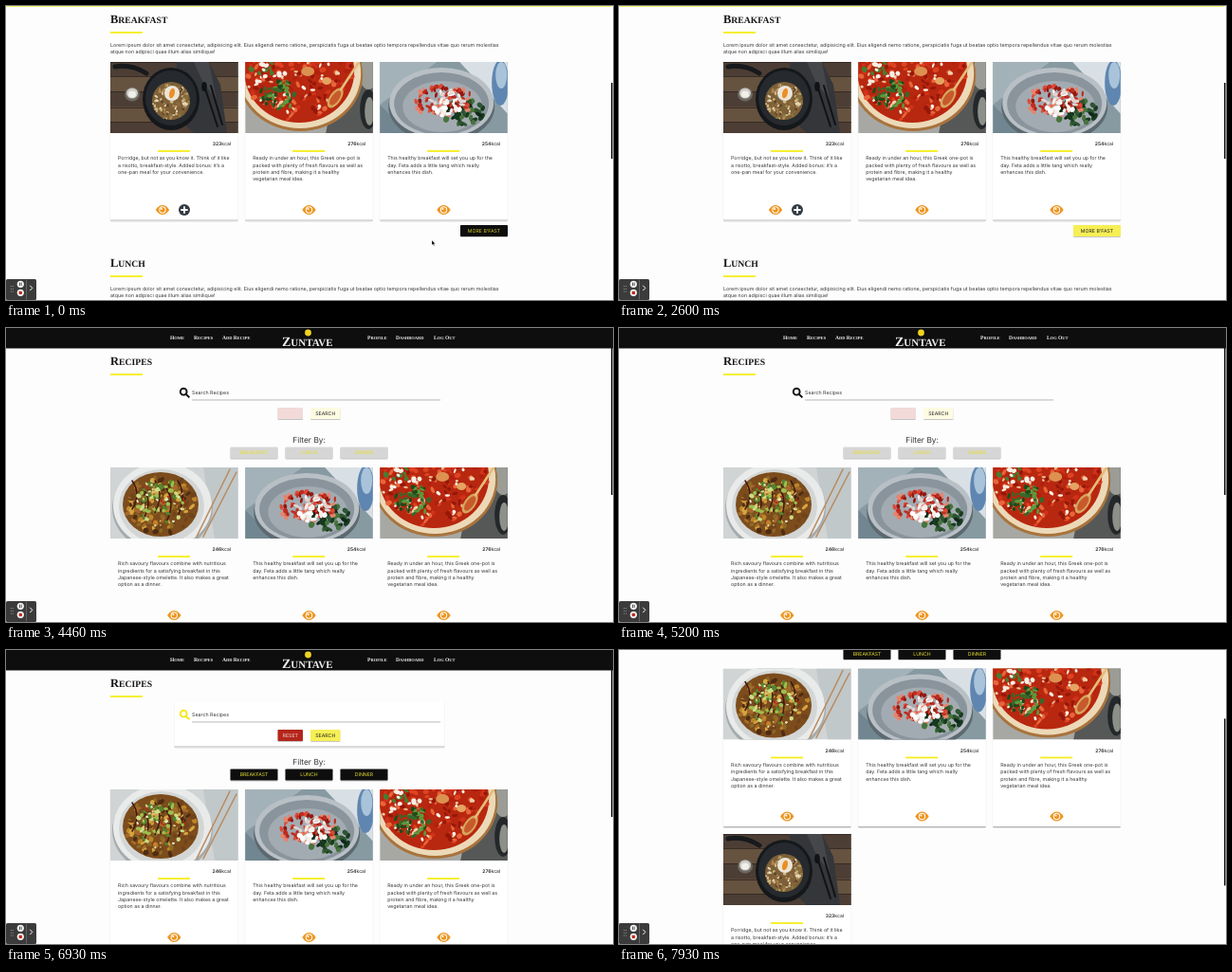
Recreate the animation shown at these times as an HTML page. Size 640 by 310 pixels, loop 8000 ms.

```html
<!DOCTYPE html>
<html lang="en">
<head>
<meta charset="utf-8">
<title>Recipe site</title>
<style>
  html, body { margin: 0; height: 100%; overflow: hidden; background: #fdfdfd; }
  svg { display: block; width: 100vw; height: 100vh; }
  svg svg { width: auto; height: auto; }
  text { font: 5.3px Inter, sans-serif; fill: #383838; text-rendering: geometricPrecision; white-space: pre; }
  .title, .title tspan { font-family: "Liberation Serif", serif; font-weight: bold; }
  .mid { text-anchor: middle; }
  .end { text-anchor: end; font-weight: 500; }
  .end tspan { font-weight: 700; }
  .bar { fill: #f6ee1c; }
  #recipes .button { fill-opacity: calc(.17 + .83 * var(--p)); }
  #recipes .shadow { opacity: var(--p); }
  #lens { fill: none; stroke-width: 1.9; stroke: color-mix(in srgb, #f4e71c calc(var(--p) * 100%), #111); }
  #more .button { fill: color-mix(in srgb, #f6ef55 calc(var(--h) * 100%), #0e0e0e); }
  #more text { fill: color-mix(in srgb, #222 calc(var(--h) * 100%), #d8cf2a); }
</style>
</head>
<body>
<svg id="stage" viewBox="0 0 640 310" preserveAspectRatio="none"></svg>
<script>
let seed = 7;
const random = () => (seed = seed * 16807 % 2147483647) / 2147483647;

const rect = (x, y, w, h, fill, extra = '') => `<rect x="${x}" y="${y}" width="${w}" height="${h}" fill="${fill}" ${extra}/>`;
const oval = (x, y, rx, ry, fill, extra = '') => `<ellipse cx="${x}" cy="${y}" rx="${rx}" ry="${ry}" fill="${fill}" ${extra}/>`;
const shape = (d, fill) => `<path d="${d}" fill="${fill}"/>`;
const line = (d, color, width) => `<path d="${d}" fill="none" stroke="${color}" stroke-width="${width}" stroke-linecap="round"/>`;
const text = (x, y, s, extra = '') => `<text x="${x}" y="${y}" ${extra}>${s}</text>`;
const lines = (x, y, list) => list.map((s, i) => text(x, y + i * 7.4, s)).join('');
const bar = (x, y) => rect(x, y - .9, 34, 1.8, '', 'class="bar"');

// White panel with faint sides and a stronger shadow underneath
const panel = (w, h) => '<g class="shadow">' + rect(-.5, 0, w + 1, h, '#ededed') + rect(0, 0, w, h, '#fff') +
  rect(0, h - .5, w, 1, '#b5b5b5') + rect(.5, h + .5, w - 1, 1, '#dedede') + '</g>';

// Small irregular pieces scattered over an ellipse
function scatter(count, x, y, rx, ry, colors, size) {
  let out = '';
  for (let i = 0; i < count; i++) {
    const angle = random() * 6.283, r = Math.sqrt(random());
    const px = (x + Math.cos(angle) * r * rx).toFixed(1), py = (y + Math.sin(angle) * r * ry).toFixed(1);
    const w = size * (.6 + random() * .7), h = size * (.4 + random() * .5);
    out += oval(px, py, w.toFixed(1), h.toFixed(1), colors[i % colors.length],
      `transform="rotate(${Math.round(random() * 180)} ${px} ${py})"`);
  }
  return out;
}

// Upper-case lettering with a larger initial for each word
const caps = (x, y, s, big, small, fill) =>
  `<text class="title" x="${x}" y="${y}" style="fill:${fill}">` + s.split(' ').map(word =>
    `<tspan style="font-size:${big}px">${word[0]}</tspan>` +
    `<tspan style="font-size:${small}px">${word.slice(1).toUpperCase()} </tspan>`).join('') + '</text>';

const photos = {
  porridge: rect(0, 0, 135, 75, '#58483c') + [0, 15, 31, 48, 63].map((y, i) =>
      rect(0, y, 135, 16, i % 2 ? '#65523f' : '#4c3e34') + rect(0, y, 135, .8, '#2f2620')).join('') +
    shape('M70 0L104 0L116 24L123 75L88 75L72 60Z', '#34363a') + shape('M88 0L104 0L112 40L98 22Z', '#45474b') +
    line('M5 5Q22 2 38 12', '#17191c', 5) +
    oval(64, 39, 30, 33, '#15181b') + oval(64, 38, 27, 29, '#262a2e') + oval(64, 41, 20, 20, '#7d6038') +
    scatter(120, 64, 42, 19, 18, ['#b08a55', '#d2b684', '#5c4328', '#877640', '#8f6a3c', '#ead9b4'], 1.7) +
    oval(65, 33, 8, 8, '#ece5d8') + oval(65, 33, 2.8, 5.5, '#ea8f26', 'transform="rotate(15 65 33)"') +
    line('M100 28L113 68M106 25L118 66', '#101214', 2) + oval(99, 26, 2.8, 5, '#101214') +
    oval(23, 34, 8, 7.5, '#6c6862') + oval(23, 33, 6, 5.5, '#cfccc5') + oval(23, 34, 4, 3.4, '#f1efea'),

  stew: rect(0, 0, 135, 75, '#a7a8a4') + shape('M100 0H135V75H85Z', '#565857') +
    oval(130, 12, 10, 17, '#9a9c95') + oval(130, 50, 9, 21, '#25282a') + oval(131, 52, 5, 15, '#8c9089') +
    oval(58, 14, 66, 59, '#a8733d') + oval(58, 12, 64, 58, '#ecd9b8') + oval(57, 10, 58, 54, '#b8270f') +
    scatter(170, 57, 14, 56, 48, ['#dc4322', '#96170a', '#d0321a', '#e8653a', '#b0200f'], 3) +
    scatter(50, 52, 20, 50, 36, ['#f6e9dc', '#e9b58a', '#fff5ea', '#efcfae'], 2.2) +
    scatter(45, 36, 34, 20, 15, ['#35692a', '#5b9a3c', '#1f4a1b'], 2.6) +
    scatter(14, 26, 8, 20, 8, ['#f7efe6', '#447f31'], 3) +
    oval(66, 10, 7, 5, '#dd9150') + oval(86, 20, 5, 4, '#e5a361') +
    oval(95, 38, 6, 12, '#d6a65c', 'transform="rotate(35 95 38)"') + oval(95, 38, 4, 9, '#c8592c', 'transform="rotate(35 95 38)"') +
    line('M101 29L120 0', '#e2bd7c', 2.6),

  feta: rect(0, 0, 135, 75, '#8799a1') + shape('M0 0H60L0 45Z', '#a3b2b8') + shape('M0 45L30 75H0Z', '#718690') +
    shape('M84 0H135V55L112 30Z', '#d9e0e5') + oval(127, 22, 9, 24, '#5f86b0') + oval(128, 14, 6, 14, '#a9c3da') +
    oval(65, 47, 56, 38, '#5c6970') + oval(65, 43, 55, 37, '#b9c0c5') + oval(65, 44, 50, 33, '#8a949c') + oval(66, 47, 42, 27, '#a3abb2') +
    scatter(45, 88, 54, 22, 15, ['#2c5530', '#47733d', '#183a20', '#0f2917'], 3.6) +
    scatter(75, 66, 41, 32, 17, ['#bf2c20', '#dc4a36', '#94180f', '#e8836b'], 2.8) +
    scatter(36, 70, 43, 18, 14, ['#f5f0ec', '#e2d3cf', '#fff'], 3),

  omelette: rect(0, 0, 135, 75, '#d0d4d4') + shape('M98 0H135V75H110Z', '#c1c8ca') +
    oval(55, 43, 53, 46, '#a5abad') + oval(55, 40, 52, 45, '#e9eaea') + oval(54, 41, 45, 39, '#d3d6d5') +
    oval(53, 39, 40, 34, '#7c4c1c') +
    scatter(130, 53, 39, 37, 31, ['#bd8529', '#d6a440', '#70431a', '#a4692a', '#8c6a25', '#4f2c13'], 3.2) +
    [0, 1, 2, 3, 4].map(i => line(`M${23 + i * 12} ${14 + i % 2 * 8}q10 14 0 ${30 + i * 2}`, '#3d1910', 1.5)).join('') +
    scatter(42, 54, 36, 27, 23, ['#9cbf4d', '#cddb86', '#55842f'], 2.8) +
    scatter(30, 52, 38, 28, 24, ['#b52a1a', '#f2e9cb', '#dfc07a'], 1.5) +
    line('M126 2L91 73M133 5L98 73', '#b88c61', 1.6)
};

const dishes = {
  porridge: [323, 'Porridge, but not as you know it. Think of it like', 'a risotto, breakfast-style. Added bonus: it’s a', 'one-pan meal for your convenience.'],
  stew: [276, 'Ready in under an hour, this Greek one-pot is', 'packed with plenty of fresh flavours as well as', 'protein and fibre, making it a healthy', 'vegetarian meal idea.'],
  feta: [254, 'This healthy breakfast will set you up for the', 'day. Feta adds a little tang which really', 'enhances this dish.'],
  omelette: [246, 'Rich savoury flavours combine with nutritious', 'ingredients for a satisfying breakfast in this', 'Japanese-style omelette. It also makes a great', 'option as a dinner.']
};

const eye = (x, y) => `<g transform="translate(${x} ${y})">` + shape('M-7.2 0Q-4 -5 0 -5T7.2 0Q4 5 0 5T-7.2 0Z', '#ee951f') +
  oval(0, 0, 3.7, 3.7, '#fff') + oval(0, 0, 2.7, 2.7, '#ee951f') + oval(-1, -1, 1, 1, '#fff') + '</g>';
const plus = (x, y) => oval(x, y, 6, 6, '#323b43') + line(`M${x - 3} ${y}h6m-3 -3v6`, '#fff', 1.8);

function card(dish, x, y, editable) {
  const [kcal, ...words] = dishes[dish];
  return `<g transform="translate(${x} ${y})">` + panel(134.6, 167) +
    `<g clip-path="url(#photo)">${photos[dish]}</g>` +
    text(127, 88.4, `<tspan>${kcal}</tspan>kcal`, 'class="end" style="font-size:5px"') + bar(50, 94) + lines(8, 103.2, words) +
    (editable ? eye(55, 156) + plus(78, 156) : eye(67.3, 156)) + '</g>';
}

const button = (x, y, w, label, fill, color) =>
  rect(x, y + .9, w, 12, '#000', 'opacity=".22" rx=".8"') + rect(x, y, w, 12, '#fff', 'rx=".8"') +
  rect(x, y, w, 12, fill, 'class="button" rx=".8"') +
  text(x + w / 2, y + 7.9, label, `class="mid" style="font-size:5.2px;${color ? 'fill:' + color : ''}"`);

const heading = (s, y) => caps(110, y, s, 12.5, 9.7, '#161616') + bar(110, y + 10);
const section = (s, y) => heading(s, y) + lines(110, y + 24.8, [
  'Lorem ipsum dolor sit amet consectetur, adipisicing elit. Eius eligendi nemo ratione, perspiciatis fuga ut beatae optio tempora repellendus vitae quo rerum molestias',
  'atque non adipisci quae illum alias similique!']);

const home = rect(0, 0, 638, 1, '#f5f06a') + section('Breakfast', 18) +
  card('porridge', 110, 59, true) + card('stew', 252.2, 59) + card('feta', 394.2, 59) +
  `<g id="more">${button(479, 231, 50, "MORE B'FAST")}</g>` +
  section('Lunch', 275);

const nav = [[173, 'Home'], [198, 'Recipes'], [228, 'Add Recipe'], [381, 'Profile'], [411, 'Dashboard'], [451, 'Log Out']];
const recipes = rect(0, 0, 640, 21.5, '#0e0e0e') + nav.map(([x, s]) => caps(x, 12.2, s, 5.6, 4.5, '#eee')).join('') +
  oval(318.5, 5, 3.4, 3.4, '#f0d51e') + caps(291, 19, 'Zuntave', 14, 11, '#eee') +
  heading('Recipes', 39) + `<g transform="translate(177.5 55)">${panel(285, 47)}</g>` +
  '<path id="lens" d="M190.6 67.2a3.4 3.4 0 1 1 -6.8 0a3.4 3.4 0 1 1 6.8 0M189.7 69.7L193.4 73.3"/>' +
  text(196, 70.3, 'Search Recipes') + rect(196, 75.6, 262, .7, '#999') +
  button(286.5, 84, 26.5, 'RESET', '#b4261b', '#f6dcd8') + button(321, 84, 31.5, 'SEARCH', '#f6ef55', '#222') +
  text(319.6, 121, 'Filter By:', 'class="mid" style="font-size:8.4px"') +
  ['BREAKFAST', 'LUNCH', 'DINNER'].map((s, i) => button(236.5 + i * 58, 125.5, 50, s, '#0e0e0e', '#e6de2a')).join('') +
  card('omelette', 110, 147) + card('feta', 252.2, 147) + card('stew', 394.2, 147) + card('porridge', 110, 321.5);

const recorder = rect(0, 288, 32, 22, '#3b3b3b', 'rx="1.5"') + rect(21, 288.5, .7, 21, '#777') +
  [295.5, 298.3, 301.1].map(y => line(`M5.3 ${y}h0M7.3 ${y}h0`, '#bbb', .9)).join('') +
  oval(15.3, 293.3, 3.6, 3.6, '#f4f4f4') + line('M14.5 292v2.6M16.2 292v2.6', '#333', .8) +
  oval(15.3, 302.3, 3.6, 3.6, '#f4f4f4') + rect(13.7, 300.7, 3.2, 3.2, '#c5281c', 'rx=".5"') +
  line('M25.5 295l2.3 2.4l-2.3 2.4', '#fff', 1);

const get = id => document.getElementById(id);
get('stage').innerHTML = `<clipPath id="photo">${rect(0, 0, 134.6, 75, '#000')}</clipPath>` +
  `<g id="home">${home}</g><g id="recipes">${recipes}</g>` +
  rect(638, 0, 1.5, 176, '#111', 'id="thumb"') + recorder +
  '<g id="cursor"><path id="arrow" d="M0 0V5L1.2 4L2 5.8L2.9 5.4L2.1 3.7H3.6Z" fill="#000" stroke="#fff" stroke-width=".3"/>' +
  '<path id="hand" d="M-.6 .4Q0 -.5 .6 .4V2.4L3 3.1V5L2.3 6.6H-.8L-2.4 4L-1.8 3.4L-.6 4.3Z" fill="#fff" stroke="#111" stroke-width=".6"/></g>';

const clamp = v => Math.max(0, Math.min(1, v));
const show = (id, on) => get(id).style.display = on ? '' : 'none';

function draw() {
  const t = performance.now() % 8000, onRecipes = t >= 4460;
  show('home', !onRecipes);
  show('recipes', onRecipes);

  const m = clamp((t - 150) / 850), e = m * m * (3 - 2 * m);
  const x = 449 + 57.5 * e, over = x > 479;
  get('cursor').setAttribute('transform', `translate(${x} ${247 - 9.5 * e})`);
  show('cursor', t < 2500);
  show('arrow', !over);
  show('hand', over);
  get('more').style.setProperty('--h', clamp((t - 680) / 250));

  const scroll = Math.min(127.5, Math.max(0, (t - 7109) * .1555));
  get('recipes').style.setProperty('--p', clamp((t - 5260) / 250));
  get('recipes').setAttribute('transform', `translate(0 ${-scroll})`);
  get('thumb').setAttribute('y', onRecipes ? scroll * 310 / 546 : 81);
  get('thumb').setAttribute('height', onRecipes ? 176 : 80);
  requestAnimationFrame(draw);
}
draw();
</script>
</body>
</html>
```
